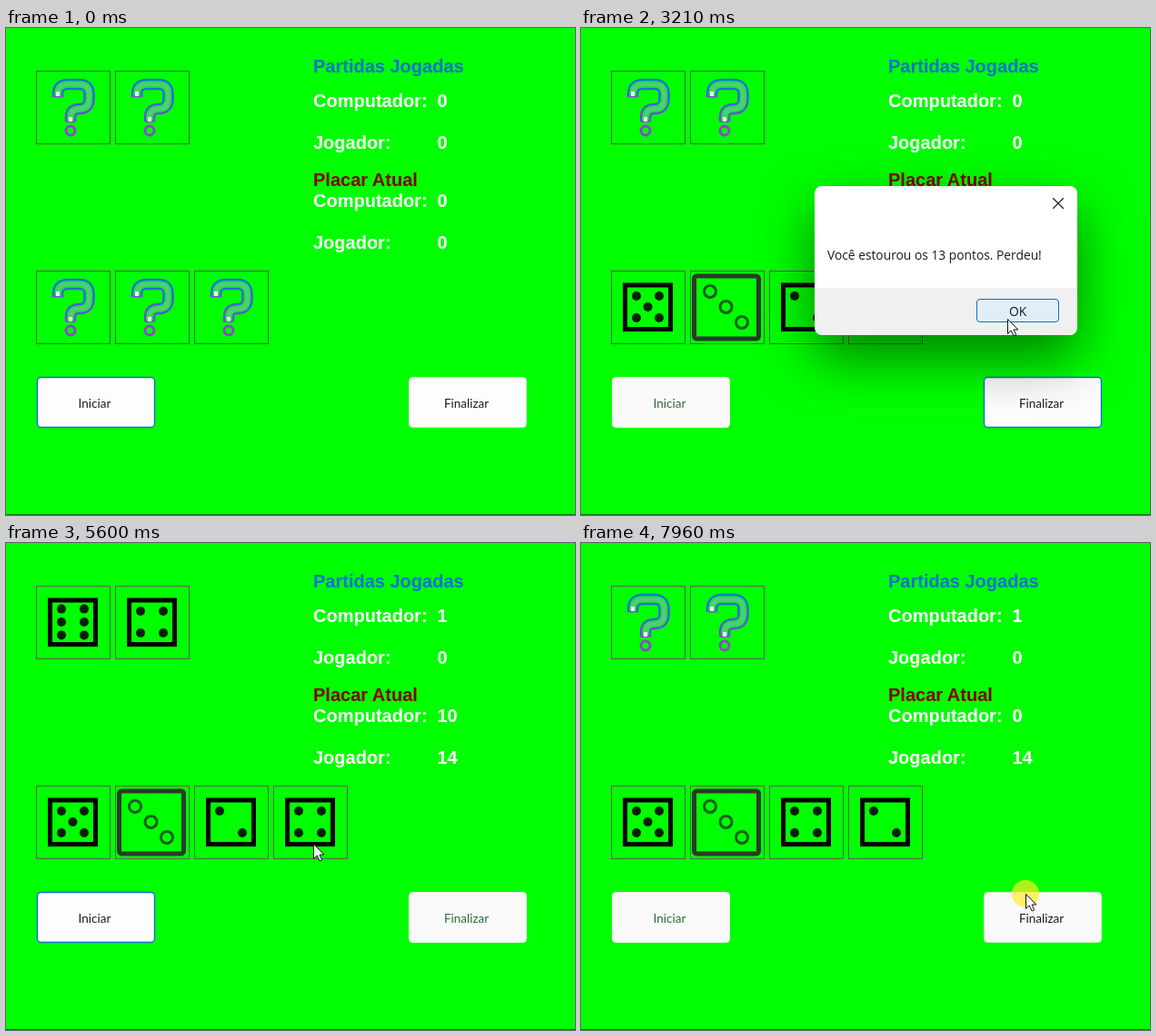
An HTML page that plays this animation: 626 px wide and 536 px high, repeating every 8 s.

```html
<!DOCTYPE html>
<html lang="pt">
<head>
<meta charset="utf-8">
<style>
  html, body { margin: 0; width: 626px; height: 536px; overflow: hidden; background: #0f0; }
  svg { position: absolute; left: 0; top: 0; }
  .board text { font: bold 20px "Liberation Sans", Arial, sans-serif; fill: #fff; }
  .board .btn { font: 13.5px Lato, sans-serif; text-anchor: middle; fill: #1b1b1b; }
  .board .off text { fill: #2c6b3c; }
  .btn-box { fill: #fdfdfd; stroke: #d4ead4; }
  .off .btn-box { fill: #f9f9f9; stroke: #f2f6f2; }
  .hover .btn-box { fill: #f9f9f9; }
  .focus .btn-box { stroke: #0a70d0; stroke-width: 1.4; }
  .dialog {
    position: absolute; top: 174px; height: 164px; border-radius: 8px; overflow: visible;
    background: linear-gradient(#fff 112px, #f0f0f0 112px);
    box-shadow: 0 25px 60px rgba(0, 0, 0, .5); transform-origin: 0 0;
    font: 13.8px/20px "Open Sans", sans-serif; color: #1a1a1a;
  }
  .dialog p { position: absolute; left: 14px; top: 66px; margin: 0; white-space: nowrap; }
  .dialog svg { left: auto; right: 15px; top: 13px; }
  .dialog b {
    position: absolute; right: 20px; top: 124px; width: 91px; height: 26px; box-sizing: border-box;
    border: 1px solid #0a70c0; border-radius: 4px; background: #fdfdfd;
    font-weight: normal; line-height: 25px; text-align: center;
  }
  .dialog b.hover { background: #e0eef9; }
</style>
</head>
<body>
<svg class="board" width="626" height="536">
  <defs>
    <linearGradient id="neon" gradientUnits="userSpaceOnUse" x1="0" y1="8" x2="0" y2="70">
      <stop offset="0" stop-color="#1672e0"/>
      <stop offset=".45" stop-color="#4a5ae0"/>
      <stop offset="1" stop-color="#9a3fd0"/>
    </linearGradient>
    <path id="hook" d="M24 28V25Q24 14 35 14H48Q58.500 14 58.500 25V30Q58.500 41 48 41Q38 41 38 50V55"/>
    <g id="d0" fill="none">
      <use href="#hook" stroke="url(#neon)" stroke-width="12.500"/>
      <use href="#hook" stroke="#10ee30" stroke-width="7.500"/>
      <use href="#hook" stroke="#5fc487" stroke-width="3.500"/>
      <path d="M19 27.500H30M33 55H43" stroke="#7a50dc" stroke-width="2"/>
      <path d="M24 22V27M38 50V55" stroke="#eefcf2" stroke-width="4"/>
      <circle cx="38" cy="65" r="5" stroke="#8c48cc" stroke-width="3"/>
    </g>
    <g id="d3" fill="none">
      <rect x="4.500" y="5" width="71" height="69" rx="3" stroke="#2b3a2b" stroke-width="5"/>
      <g stroke="#14601c" stroke-width="3">
        <circle cx="22" cy="22" r="6.500"/><circle cx="39.500" cy="39" r="6.500"/><circle cx="57" cy="56" r="6.500"/>
      </g>
    </g>
  </defs>
  <path d="M0 535.500H626" stroke="#0a7a1a"/>
  <text x="338" y="49" style="fill:#1470d0">Partidas Jogadas</text>
  <text x="338" y="174" style="fill:#800000">Placar Atual</text>
  <g id="labels"></g>
  <g id="slots"></g>
  <g id="start">
    <rect class="btn-box" x="34.500" y="384.500" width="129" height="55" rx="4"/>
    <text class="btn" x="97.500" y="418">Iniciar</text>
  </g>
  <g id="finish">
    <rect class="btn-box" x="443.500" y="384.500" width="129" height="55" rx="4"/>
    <text class="btn" x="506.500" y="418">Finalizar</text>
  </g>
</svg>
<div id="dialogs"></div>
<svg width="626" height="536">
  <g id="cursor">
    <circle id="press" r="15" fill="#ffee28" fill-opacity=".68"/>
    <path d="M.5 .5V16.500L4.200 13L7 19L9.700 17.800L7 12H11.800Z" fill="#fff" stroke="#111"/>
  </g>
</svg>
<script>
const LOOP = 8000;
const $ = id => document.getElementById(id);
const NS = 'http://www.w3.org/2000/svg';

function add(parent, tag, attrs, text = '') {
  const el = document.createElementNS(NS, tag);
  for (const k in attrs) el.setAttribute(k, attrs[k]);
  el.textContent = text;
  parent.append(el);
  return el;
}

// Dice faces
const pips = {
  2: [[0, 0], [1, 1]],
  4: [[0, 0], [1, 0], [0, 1], [1, 1]],
  5: [[0, 0], [1, 0], [.5, .5], [0, 1], [1, 1]],
  6: [[0, -.1], [1, -.1], [0, .5], [1, .5], [0, 1.1], [1, 1.1]]
};
const defs = document.querySelector('defs');
for (const n in pips) {
  const g = add(defs, 'g', { id: 'd' + n });
  add(g, 'rect', { x: 15.5, y: 15, width: 50, height: 48.5, fill: 'none', stroke: '#000', 'stroke-width': 5 });
  for (const [x, y] of pips[n]) add(g, 'circle', { cx: 28 + 25 * x, cy: 27 + 24 * y, r: 5, fill: '#032003' });
}

const slots = [[33, 48], [120, 48], [33, 268], [120, 268], [207, 268], [294, 268]].map(([x, y]) => {
  const g = add($('slots'), 'g', { transform: `translate(${x} ${y})` });
  add(g, 'rect', { x: .5, y: -.5, width: 81, height: 80, fill: 'none', stroke: '#4f6a4a' });
  return { g, face: add(g, 'use', {}) };
});

const scores = [87, 133, 197, 243].map((y, i) => {
  add($('labels'), 'text', { x: 338, y }, i % 2 ? 'Jogador:' : 'Computador:');
  return add($('labels'), 'text', { x: 474.5, y });
});

// Message boxes: left, width, text, open and close times
const dialogs = [
  [257, 289, 'Você estourou os 13 pontos. Perdeu!', 2560, 3480],
  [299, 206, 'Perdeu, estourou limite!', 4850, 5400],
  [257, 289, 'Você estourou os 13 pontos. Perdeu!', 6970, 7490]
].map(([left, width, text, open, close]) => {
  const el = document.createElement('div');
  el.className = 'dialog';
  el.style.left = left + 'px';
  el.style.width = width + 'px';
  el.innerHTML = `<p>${text}</p><b>OK</b><svg width="12" height="12"><path d="M0 0L12 12M12 0L0 12" stroke="#222" stroke-width="1.300"/></svg>`;
  $('dialogs').append(el);
  return { el, ok: el.querySelector('b'), right: left + width, open, close };
});

// Game states: time, dice (-1 hides a slot), scores, disabled button, focused button
const states = [
  [0, [0, 0, 0, 0, 0, -1], [0, 0, 0, 0], '', 'start'],
  [1490, [0, 0, 5, 3, 0, -1], [0, 0, 0, 8], 'start', 'finish'],
  [1890, [0, 0, 5, 3, 2, 0], [0, 0, 0, 10], 'start', 'finish'],
  [2500, [0, 0, 5, 3, 2, 4], [0, 0, 0, 14], 'start', 'finish'],
  [4020, [6, 4, 5, 3, 2, 4], [0, 0, 10, 14], 'finish', 'start'],
  [5400, [6, 4, 5, 3, 2, 4], [1, 0, 10, 14], 'finish', 'start'],
  [6100, [0, 0, 5, 3, 0, -1], [1, 0, 0, 8], 'start', ''],
  [6530, [0, 0, 5, 3, 4, 0], [1, 0, 0, 12], 'start', ''],
  [6880, [0, 0, 5, 3, 4, 2], [1, 0, 0, 14], 'start', '']
];

// Pointer path: time, x, y
const path = [
  [320, 552, 240], [540, 430, 400], [760, 250, 466], [1000, 90, 433], [1490, 90, 433],
  [1690, 245, 320], [1900, 245, 320], [2300, 335, 315], [2600, 335, 315], [3150, 469, 320],
  [3490, 469, 320], [3800, 500, 400], [4100, 500, 400], [4700, 570, 291], [4850, 570, 291],
  [5170, 445, 299], [5420, 445, 299], [5970, 120, 395], [6140, 120, 395], [6270, 186, 356],
  [6420, 240, 312], [6540, 240, 312], [6760, 330, 312], [6960, 330, 312], [7210, 415, 328],
  [7340, 470, 318], [7490, 470, 318], [7900, 489, 386], [8000, 489, 386]
];
const presses = [
  [1030, 1490], [1690, 1890], [2360, 2500], [3280, 3480], [3830, 4020],
  [5250, 5400], [6000, 6100], [6460, 6530], [6800, 6880], [7400, 7490], [7940, 8000]
];

const clamp = v => Math.max(0, Math.min(1, v));

function pointer(t) {
  const i = Math.max(1, path.findIndex(p => p[0] > t));
  const [t0, x0, y0] = path[i - 1], [t1, x1, y1] = path[i];
  const k = clamp((t - t0) / (t1 - t0));
  return [x0 + (x1 - x0) * k, y0 + (y1 - y0) * k];
}

function render(t) {
  const [, dice, points, off, focus] = states.filter(s => s[0] <= t).pop();
  slots.forEach(({ g, face }, i) => {
    g.style.display = dice[i] < 0 ? 'none' : '';
    face.setAttribute('href', '#d' + Math.max(0, dice[i]));
  });
  scores.forEach((el, i) => { el.textContent = points[i]; });

  const [x, y] = pointer(t);
  const over = (l, top, r, b) => t >= 320 && x >= l && x < r && y >= top && y < b;
  for (const [id, left] of [['start', 34], ['finish', 443]]) {
    const cls = $(id).classList;
    cls.toggle('off', off === id);
    cls.toggle('focus', focus === id);
    cls.toggle('hover', over(left, 384, left + 130, 440));
  }

  for (const { el, ok, right, open, close } of dialogs) {
    const rest = 1 - clamp((t - open) / 330);
    const gone = clamp((t - close) / 140);
    el.style.display = t < open || gone === 1 ? 'none' : '';
    el.style.opacity = clamp((t - open + 30) / 150) * (1 - gone);
    el.style.transform = `scale(${1 - .1 * rest * rest - .06 * gone})`;
    ok.classList.toggle('hover', over(right - 111, 298, right - 20, 324));
  }

  $('cursor').style.display = t < 320 ? 'none' : '';
  $('cursor').setAttribute('transform', `translate(${Math.round(x)} ${Math.round(y)})`);
  $('press').style.display = presses.some(([a, b]) => t >= a && t < b) ? '' : 'none';
}

const begin = performance.now();
function tick() {
  render((performance.now() - begin) % LOOP);
  requestAnimationFrame(tick);
}
tick();
</script>
</body>
</html>
```
